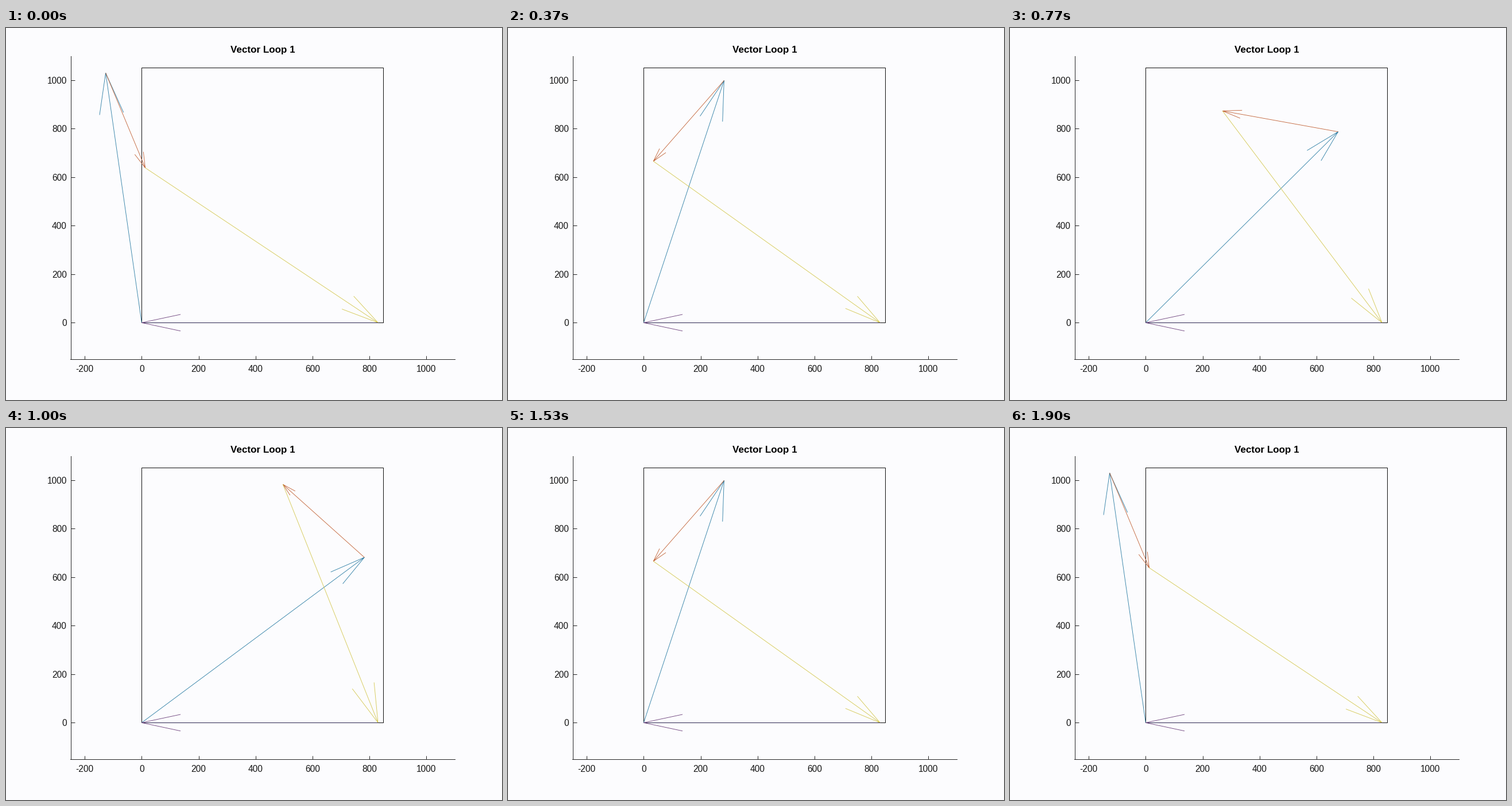
These frames come from a looping animation (864 px wide and 648 px high, 1.93 s). A matplotlib script:

```python
import numpy as np
import matplotlib.pyplot as plt
from matplotlib.animation import FuncAnimation
from matplotlib.transforms import Affine2D

W, H, DPI = 864, 648, 72
RECT = 0.13, 0.11, 0.775, 0.815
TICKS = 193                      # 10 ms each
STEPS = 58                       # poses per loop, there and back
GROUND, COUPLER, CRANK = 830.0, 415.0, 1037.5
HEAD, SPREAD = 0.1645, 0.25
BLUE, ORANGE, YELLOW, PURPLE = "#3482a8", "#c4683e", "#d6ca58", "#70467f"
INK, TEXT = "#262626", "#151515"

plt.rcParams["font.family"] = "Liberation Sans"

fig = plt.figure(figsize=(W / DPI, H / DPI), dpi=DPI, facecolor="#fcfcfe")
ax = fig.add_axes(RECT, facecolor="none")
ax.set(xlim=(-250, 1100), ylim=(-150, 1100))
ax.spines[["top", "right"]].set_visible(False)
ax.spines["left"].set_position(("outward", -0.5))
for side in ("left", "bottom"):
    ax.spines[side].set(linewidth=1, color=INK)
x_ticks, y_ticks = range(-200, 1001, 200), range(0, 1001, 200)
ax.set_xticks(x_ticks)
ax.set_yticks(y_ticks)
ax.tick_params(direction="in", length=6.5, width=1, color=INK,
               labelleft=False, labelbottom=False)


def label(x, y, text, size=15.5, **style):
    """Text with its baseline at pixel (x, y), y counted from the bottom."""
    fig.text(x / W, y / H, text, size=size, va="baseline", **style)


for v in x_ticks:
    x = ax.transData.transform((v, 0))[0]
    label(x, 49, str(v), ha="center", color=TEXT)
for v in y_ticks:
    y = ax.transData.transform((0, v))[1]
    label(106, y - 6, str(v), ha="right", color=TEXT)
label(447.2, 605.5, "Vector Loop 1", 17.05, ha="center", weight="bold", color="black")


def line(color, xs=(), ys=(), width=1, **style):
    return ax.plot(xs, ys, color=color, lw=width, solid_joinstyle="bevel",
                   solid_capstyle="butt", clip_on=False, **style)[0]


def arrow(start, tip):
    """Shaft, a gap, then the open head."""
    d = tip - start
    back = HEAD * np.abs(d).max() / np.hypot(*d) * d
    side = SPREAD * np.array([-back[1], back[0]])
    gap = np.full(2, np.nan)
    return np.array([start, tip, gap, tip - back + side, tip, tip - back - side]).T


def pose(step):
    """Crank tip and coupler tip of the four-bar linkage."""
    theta = np.radians(np.interp(min(step, STEPS - 1 - step), [0, 28], [97, 39]))
    a = CRANK * np.array([np.cos(theta), np.sin(theta)])
    d = PIVOT - a
    dist = np.hypot(*d)
    along = (dist**2 + COUPLER**2 - CRANK**2) / (2 * dist)
    off = np.sqrt(COUPLER**2 - along**2)
    u = d / dist
    return a, a + along * u + off * np.array([u[1], -u[0]])


ORIGIN, PIVOT = np.zeros(2), np.array([GROUND, 0.0])

# Straight edges fall on the pixel that contains them.
floor = ax.transData + Affine2D().translate(-0.5, 0.5)
line("#111111", [0, 850, 850, 0, 0], [0, 0, 1050, 1050, 0], transform=floor)
links = [line(c, width=0.9) for c in (BLUE, ORANGE, YELLOW)]
line("#2b2550", [GROUND, 0], [0, 0], transform=floor)
line(PURPLE, *arrow(PIVOT, ORIGIN)[:, 3:], width=0.9)


def update(tick):
    a, b = pose((6 * tick + 3) // 20)
    ends = [(ORIGIN, a), (a, b), (b, PIVOT)]
    for link, (start, tip) in zip(links, ends):
        link.set_data(*arrow(start, tip))
    return links


anim = FuncAnimation(fig, update, frames=TICKS, interval=10,
                     repeat=True, repeat_delay=0, blit=False)
plt.show()
```
